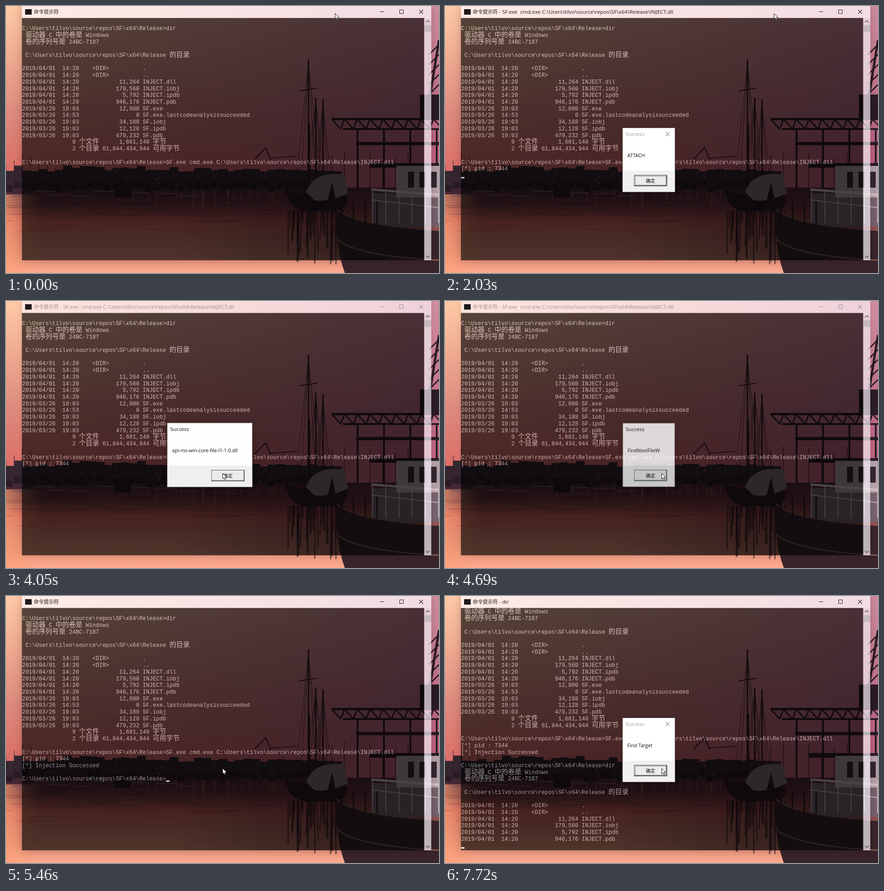
An HTML page with a canvas that plays this animation: 952 px wide and 588 px high, repeating every 8 s.

```html
<!DOCTYPE html>
<html lang="zh">
<head>
<meta charset="utf-8">
<style>
html, body { margin: 0; width: 100%; height: 100%; overflow: hidden; background: #d88478; }
canvas { display: block; }
</style>
</head>
<body>
<canvas id="stage" width="952" height="588"></canvas>
<script>
const W = 952, H = 588, LOOP = 8000;
const CELL = 7.37, ROW = 14.72, LEFT = 35.3, TOP = 27, OPACITY = 0.65;
const WINDOW = { x: 35, y: 26, w: 900, h: 534, bar: 15.5 };
const CJK = '"Noto Sans CJK SC", "Noto Sans CJK", sans-serif';
const UI = '"Open Sans", "Noto Sans", ' + CJK;
const ctx = document.getElementById('stage').getContext('2d');

const clamp = v => Math.max(0, Math.min(1, v));
const progress = (t, start, length) => clamp((t - start) / length);
const easeOut = p => 1 - (1 - p) * (1 - p);
const smooth = p => p * p * (3 - 2 * p);
const between = (t, a, b) => t >= a && t < b;

function newLayer() {
  const canvas = document.createElement('canvas');
  canvas.width = W;
  canvas.height = H;
  return canvas.getContext('2d');
}

function box(g, fill, x, y, w, h) {
  g.fillStyle = fill;
  g.fillRect(x, y, w, h);
}

function line(g, color, width, x0, y0, x1, y1) {
  g.strokeStyle = color;
  g.lineWidth = width;
  g.beginPath();
  g.moveTo(x0, y0);
  g.lineTo(x1, y1);
  g.stroke();
}

function fillPath(g, fill, path) {
  g.fillStyle = fill;
  g.fill(new Path2D(path));
}

function cross(g, color, x, y, r) {
  line(g, color, 1.1, x - r, y - r, x + r, y + r);
  line(g, color, 1.1, x + r, y - r, x - r, y + r);
}

// Evenly spaced colours between two points
function blend(g, x0, y0, x1, y1, ...colors) {
  const fill = g.createLinearGradient(x0, y0, x1, y1);
  colors.forEach((color, i) => fill.addColorStop(i / (colors.length - 1), color));
  return fill;
}

// Harbour at dusk, as flat silhouettes
const DARK = '#2a1b24', SHORE = 400;

function paintSkyAndWater(g, rnd) {
  box(g, blend(g, 0, 0, 0, 360, '#ffcaa6', '#eeaa90', '#dd8a7c', '#dc7068'), 0, 0, W, SHORE);
  box(g, blend(g, 0, 0, W, 0, 'rgba(150,70,140,0)', 'rgba(160,70,135,.22)', 'rgba(160,80,150,.5)'), 0, 0, W, SHORE);
  box(g, blend(g, 0, SHORE, 0, H, '#402834', '#6a3540', '#cc6259', '#cc7c6c', '#e09078', '#ffab92'), 0, SHORE, W, H - SHORE);
  box(g, blend(g, 380, 0, 740, 0, 'rgba(90,40,50,0)', 'rgba(90,40,50,.45)'), 380, SHORE, W, 160);
  box(g, blend(g, 0, 0, 80, 0, 'rgba(255,160,115,.65)', 'rgba(255,160,115,0)'), 0, SHORE + 15, 80, H);
  for (let i = 0; i < 90; i++) {
    const depth = rnd() * rnd();
    box(g, `rgba(50,25,38,${.4 - .3 * depth})`, rnd() * 720 - 40, SHORE + 8 + depth * 110, 20 + rnd() * 90, 1.5);
  }
  for (let i = 0; i < 45; i++) {
    box(g, 'rgba(240,140,105,.3)', 240 + rnd() * 370, SHORE + 6, 1.5, rnd() * 40);
  }
}

function paintShore(g, rnd) {
  for (let x = 0; x < 730; x += 18) {
    const h = 34 + rnd() * 20 * (1 - x / 1000);
    box(g, '#352630', x, SHORE - h, 19, h + 4);
    box(g, DARK, x, SHORE - 18 + rnd() * 14, 14, 14);
    line(g, DARK, 1, x, SHORE, x, SHORE - 40 - rnd() * 40 * (x < 140));
  }
  for (let i = 0; i < 50; i++) {
    box(g, i % 4 ? '#8f5555' : '#eda878', 150 + rnd() * 470, 356 + rnd() * 42, 2, 1.5);
  }
  for (let i = 0; i < 9; i++) box(g, '#72545c', i * 45 + rnd() * 20, 407 + rnd() * 12, 45, 2);
  fillPath(g, DARK, 'M238 422V402L255 394L275 402V422Z');
  [-1, 1].forEach(side => line(g, DARK, 2, 571, 312, 564 + side * 18, 338));
  line(g, DARK, 1.5, 580, 335, 640, 331);
}

function paintGantry(g, rnd) {
  const left = 716, top = 249, bottom = 271;
  line(g, DARK, 5, left, top, W, top);
  line(g, DARK, 4, left + 25, bottom, W, bottom);
  for (let x = left; x < W; x += 28) {
    line(g, DARK, 3, x, top, x + 20, bottom);
    line(g, DARK, 3, x + 28, top, x + 20, bottom);
    line(g, DARK, 1.2, x, SHORE, x, 305 + rnd() * 50);
  }
  for (let x = 773; x < W; x += 58) line(g, DARK, 4, x, bottom, x, SHORE);
  line(g, DARK, 7, 770, 303, W, 303);
  line(g, DARK, 10, 800, 351, W, 351);
  box(g, DARK, 910, 195, W, 55);
  line(g, DARK, 5, W, 75, 932, 200);
  for (let y = 85; y < 240; y += 22) line(g, DARK, 3, 930, y + 22, W, y);
}

function paintMast(g, x, top, spread) {
  line(g, DARK, 3, x, top, x, 430);
  [-1, -.6, .6, 1].forEach(k => line(g, DARK, .8, x, top + 10, x + spread * k, 410));
}

function paintShip(g, rnd) {
  paintMast(g, 665, 118, 30);
  paintMast(g, 681, 202, 25);
  paintMast(g, 697, 205, 20);
  line(g, DARK, 5, 666, 260, 666, 430);
  line(g, DARK, 2, 645, 187, 684, 181);
  for (let i = 0; i < 40; i++) {
    const x = 620 + rnd() * 130;
    line(g, 'rgba(32,20,28,.55)', 3, x, 450, x + rnd() * 8 - 4, 470 + rnd() * 100);
  }
  fillPath(g, DARK, 'M614 402L640 412L745 415Q758 430 735 452H655Q620 446 614 402Z');
  fillPath(g, '#80707a', 'M660 410Q676 362 744 371L752 412Q715 432 678 428Z');
  fillPath(g, DARK, 'M706 432L717 388L726 432Z');
}

function paintTrawler(g) {
  box(g, '#75626c', 803, 412, W, 75);
  box(g, '#b6a0a8', 858, 352, W, 70);
  for (let x = 884; x < W; x += 25) box(g, '#332830', x, 365, 13, 35);
  for (let x = 806; x < W; x += 29) line(g, '#c9b1b7', 2, x, 404, x, 478);
  line(g, '#d5bfc3', 5, 803, 404, W, 416);
  line(g, '#c7adb4', 2, 803, 427, W, 444);
  const rim = 'M728 447Q765 484 952 494';
  fillPath(g, '#38242a', rim + 'V588H745Q722 525 728 447Z');
  g.strokeStyle = '#82584f';
  g.lineWidth = 3;
  g.stroke(new Path2D(rim));
  g.translate(0, 66);
  g.stroke(new Path2D(rim));
  g.translate(0, -66);
  for (let x = 738; x < 840; x += 26) line(g, DARK, 3, x, 430, x, 480);
}

function paintHarbour() {
  const g = newLayer(), rnd = seeded(71);
  [paintSkyAndWater, paintShore, paintGantry, paintShip, paintTrawler].forEach(paint => paint(g, rnd));
  return g.canvas;
}

function seeded(seed) {
  return () => (seed = (seed * 16807) % 2147483647) / 2147483647;
}

// Console contents
const path = 'C:\\Users\\tilvo\\source\\repos\\SF\\x64\\Release';
const prompt = path + '>';
const command = 'SF.exe cmd.exe ' + path + '\\INJECT.dll';
const indent = ' '.repeat(15);
const APRIL = '2019/04/01  14:20', MARCH = '2019/03/26  19:03';
const entry = (date, size, name) => date + size.padStart(18) + ' ' + name;
const folder = name => APRIL + '    <DIR>          ' + name;
const listing = [
  ' 驱动器 C 中的卷是 Windows',
  ' 卷的序列号是 24BC-7187',
  '',
  ' ' + path + ' 的目录',
  '',
  folder('.'),
  folder('..'),
  entry(APRIL, '11,264', 'INJECT.dll'),
  entry(APRIL, '179,560', 'INJECT.iobj'),
  entry(APRIL, '5,792', 'INJECT.ipdb'),
  entry(APRIL, '946,176', 'INJECT.pdb'),
  entry(MARCH, '12,800', 'SF.exe'),
  entry('2019/03/26  14:53', '0', 'SF.exe.lastcodeanalysissucceeded'),
  entry(MARCH, '34,188', 'SF.iobj'),
  entry(MARCH, '12,128', 'SF.ipdb'),
  entry(MARCH, '479,232', 'SF.pdb'),
  indent + '9 个文件      1,681,140 字节',
  indent + '2 个目录 61,844,434,944 可用字节',
  ''
];

const RUN = 860, DONE = 5300, TYPE = 6620, ENTER = 7320, SCROLL = 7390;

function consoleState(t) {
  const lines = ['', prompt + 'dir', ...listing, prompt + command];
  let cursorOn = t >= 460;
  if (t >= RUN) {
    lines.push('[*] pid : 7344', '');
    cursorOn = t < 1480 || between(t, 2030, 2580);
  }
  if (t >= DONE) {
    const typed = t < TYPE ? 0 : 1 + Math.floor((t - TYPE) / 190);
    lines.splice(-1, 1, '[*] Injection Successed', '', prompt + 'dir'.slice(0, typed));
    cursorOn = !between(t, 6320, TYPE);
  }
  if (t >= SCROLL) lines.push(...listing.slice(0, 11), '');
  return { lines: lines.slice(t >= SCROLL ? 2 : 0), cursorOn };
}

function drawRow(text, y) {
  let col = 0;
  for (const run of text.match(/ +|[\u2e80-\uffff]+|[^ \u2e80-\uffff]+/g) || []) {
    const wide = run.charCodeAt(0) > 0x2e80;
    ctx.font = wide ? `300 14.74px ${CJK}` : '12.28px "Liberation Mono", monospace';
    ctx.fillText(run, LEFT + col * CELL, y);
    col += run.length * (wide ? 2 : 1);
  }
}

function drawConsole(t) {
  const { lines, cursorOn } = consoleState(t);
  const { x, y, w, h, bar } = WINDOW;
  box(ctx, `rgba(0,0,0,${OPACITY})`, x, y, w - bar, h);
  ctx.save();
  // Light is added, since the text shares the translucency of its window.
  ctx.globalCompositeOperation = 'lighter';
  ctx.fillStyle = `rgba(204,204,204,${OPACITY})`;
  lines.forEach((text, row) => drawRow(text, TOP + row * ROW + 11.4));
  if (cursorOn) {
    const row = lines.length - 1;
    box(ctx, '#bbb', LEFT + lines[row].length * CELL, TOP + row * ROW + 11, CELL, 3.2);
  }
  ctx.restore();
}

function drawScrollbar() {
  const { x, y, w, h, bar } = WINDOW;
  const left = x + w - bar, center = left + bar / 2;
  box(ctx, 'rgba(240,235,240,.72)', left, y, bar, h);
  box(ctx, 'rgba(175,170,175,.55)', left, y + 16, bar, 15);
  [[y + 8, -1], [y + h - 8, 1]].forEach(([cy, way]) => {
    [-1, 1].forEach(side => line(ctx, '#5b4b51', 1.4, center, cy + 2 * way, center + 4 * side, cy - 2 * way));
  });
}

function titleSuffix(t) {
  if (between(t, RUN, DONE)) return ' - ' + command.replace(' ', '  ');
  return t >= ENTER ? ' - dir' : '';
}

function drawTitleBar(t, active) {
  const ink = active ? '#211b1e' : '#a18d94';
  box(ctx, active ? 'rgba(255,250,255,.73)' : 'rgba(255,245,250,.67)', WINDOW.x, 0, WINDOW.w, WINDOW.y + .5);
  box(ctx, '#1d181b', 42, 7, 14.5, 12);
  ctx.fillStyle = ink;
  ctx.font = `11px ${CJK}`;
  ctx.fillText('命令提示符', 61, 17);
  ctx.font = `11.6px ${UI}`;
  ctx.fillText(titleSuffix(t), 116, 17);
  line(ctx, ink, 1, 822, 12.5, 831.5, 12.5);
  ctx.strokeRect(865.5, 8.5, 8, 8);
  cross(ctx, ink, 912.7, 12.7, 4.3);
}

function drawWindowShadow(active) {
  const { x, y, w, h } = WINDOW;
  ctx.save();
  ctx.beginPath();
  ctx.rect(0, 0, W, H);
  ctx.rect(x, 0, w, y + h);
  ctx.clip('evenodd');
  ctx.shadowColor = `rgba(40,0,20,${active ? .22 : .1})`;
  ctx.shadowBlur = active ? 18 : 10;
  box(ctx, '#000', x, 0, w, y + h);
  ctx.restore();
}

// Message boxes: "focus" is when one takes the focus, "close" when its button is pressed.
const messages = [
  { text: 'ATTACH', open: 1000, focus: 3110, close: 3210 },
  { text: 'api-ms-win-core-file-l1-1-0.dll', open: 3350, close: 4050 },
  { text: 'FindNextFileW', open: 4150, close: 4650 },
  { text: 'DETACH', open: 4800, focus: 5140, close: 5180 },
  { text: 'Find Target', open: 7470, focus: LOOP, close: LOOP }
];
const CENTER = { x: 448, y: 339 };
const layer = newLayer();

function drawButton(g, x, y, pressed) {
  const w = 73, h = 25;
  box(g, '#505050', x, y, w, h);
  box(g, '#a8a8a8', x + 1, y + 1, w - 2.5, h - 2.5);
  box(g, '#ececec', x + 1, y + 1, w - 3.5, h - 3.5);
  if (!pressed) {
    g.strokeStyle = '#777';
    g.strokeRect(x + 2.5, y + 2.5, w - 5, h - 5);
  }
  g.fillStyle = '#111';
  g.font = `10.2px ${CJK}`;
  g.fillText('确定', x + 26.3, y + 16.5);
}

function paintMessage(g, text, focused, closing) {
  const ink = focused ? '#111' : '#999', bodyFont = `10.7px ${UI}`;
  g.clearRect(0, 0, W, H);
  g.font = bodyFont;
  const w = Math.max(115, Math.round(g.measureText(text).width) + 43), h = 141;
  const x = CENTER.x - w / 2, y = CENTER.y - h / 2;
  g.shadowColor = `rgba(0,0,0,${focused ? .35 : .2})`;
  g.shadowBlur = focused ? 12 : 7;
  box(g, '#fff', x, y, w, h);
  g.shadowColor = 'transparent';
  box(g, '#f0f0f0', x, y + 94, w, h - 94);
  g.strokeStyle = 'rgba(110,100,105,.45)';
  g.lineWidth = 1;
  g.strokeRect(x, y, w, h);
  g.fillStyle = '#111';
  g.fillText(text, x + 10.5, y + 64.5);
  g.fillStyle = ink;
  g.font = `11.4px ${UI}`;
  g.fillText('Success', x + 6.5, y + 17.7);
  if (!closing) cross(g, ink, x + w - 16, y + 13.5, 4.5);
  drawButton(g, x + w - 90, y + 103.5, focused);
}

function drawMessage(t, { text, open, focus = open, close }) {
  const visible = t < close ? easeOut(progress(t, open, 230)) : 1 - progress(t, close, 230);
  if (!visible) return;
  paintMessage(layer, text, t >= focus, t >= close);
  const scale = .955 + .045 * visible;
  ctx.save();
  ctx.globalAlpha = visible;
  ctx.translate(CENTER.x, CENTER.y);
  ctx.scale(scale, scale);
  ctx.drawImage(layer.canvas, -CENTER.x, -CENTER.y);
  ctx.restore();
}

const arrow = new Path2D('M0 0V12.3L2.8 9.8L4.8 14L6.8 13.1L4.9 9L8.6 8.7Z');

function drawPointer(t) {
  const glide = smooth(progress(t, 2580, 380));
  ctx.save();
  ctx.translate(723.5 - 264 * glide + 17 * progress(t, 3820, 150), 16.5 + 363 * glide);
  if (between(t, 5690, 5770)) {
    ctx.strokeStyle = '#4aa3c4';
    ctx.lineWidth = 2;
    ctx.beginPath();
    ctx.arc(10, 0.5, 4.2, 0, 7);
    ctx.stroke();
  }
  ctx.fillStyle = '#fff';
  ctx.strokeStyle = '#151515';
  ctx.lineWidth = 1;
  ctx.fill(arrow);
  ctx.stroke(arrow);
  ctx.restore();
}

const harbour = paintHarbour();

function draw(t) {
  const active = t < 3110 || between(t, 4800, 5140) || t >= 5340;
  ctx.drawImage(harbour, 0, 0);
  drawWindowShadow(active);
  drawConsole(t);
  drawScrollbar();
  drawTitleBar(t, active);
  messages.forEach(message => drawMessage(t, message));
  drawPointer(t);
}

const start = performance.now();
function tick() {
  draw((performance.now() - start) % LOOP);
  requestAnimationFrame(tick);
}
tick();
</script>
</body>
</html>
```
